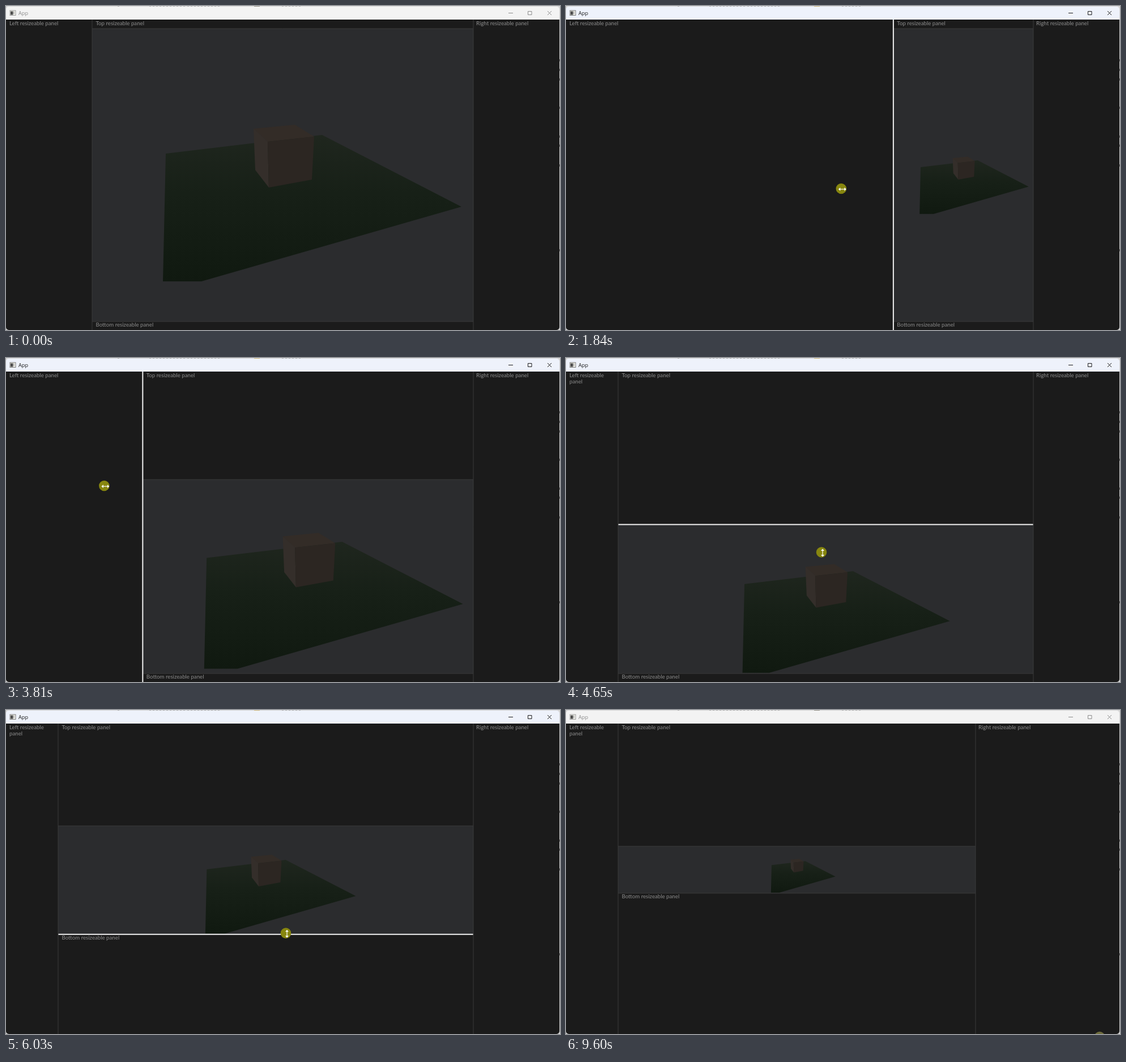
Write an HTML page with a canvas that moves like this. It is 978 px wide and 573 px high and loops after 9630 ms.

```html
<!DOCTYPE html>
<html lang="en">
<head>
<meta charset="utf-8">
<title>Resizeable panels</title>
<style>
html, body { margin: 0; width: 100%; height: 100%; overflow: hidden; background: #d9d9d9; }
canvas { display: block; }
</style>
</head>
<body>
<canvas id="stage" width="978" height="573"></canvas>
<script>
const ctx = document.getElementById('stage').getContext('2d');
const LOOP = 9630, WIDTH = 977, HEIGHT = 573, BAR = 24;

// Keys are [time, value, ...]
const leftKeys = [[1140, 152], [1520, 790], [1680, 790], [1840, 579], [2070, 353], [3600, 353], [3810, 242], [3980, 92]];
const topKeys = [[2480, 40], [2960, 215], [4480, 215], [4650, 294], [4900, 415], [4980, 415], [5260, 205], [6380, 205], [6520, 241]];
const bottomKeys = [[5620, 558], [6030, 397], [6270, 324]];
const rightKeys = [[6720, 825], [7050, 102], [7080, 93], [7500, 93], [7840, 685], [7950, 710], [8480, 710], [8700, 723]];
const cursorKeys = [
  [130, 955, 590], [500, 560, 430], [900, 170, 305], [1080, 152, 300], [1130, 152, 300],
  [1480, 800, 310], [1620, 815, 315], [1840, 487, 323], [1960, 372, 322], [2080, 361, 320],
  [2110, 361, 320], [2400, 560, 41], [2480, 560, 41], [2900, 540, 215], [3160, 540, 215],
  [3480, 354, 228], [3560, 354, 228], [3810, 174, 226], [3950, 92, 222], [4150, 92, 222],
  [4400, 467, 214], [4460, 467, 214], [4650, 451, 343], [4850, 455, 418], [4940, 455, 418],
  [5220, 470, 206], [5290, 470, 206], [5560, 490, 558], [5620, 490, 558], [6030, 494, 395],
  [6250, 500, 325], [6340, 500, 206], [6500, 500, 241], [6660, 825, 300], [6700, 825, 300],
  [7050, 79, 330], [7420, 79, 330], [7500, 40, 335], [7840, 707, 345], [7950, 714, 346],
  [8480, 714, 346], [8700, 723, 350], [8970, 723, 350], [9230, 917, 590]
];
const drags = [
  [1080, 2090, 'left'], [2450, 3060, 'top'], [3530, 4150, 'left'], [4430, 5290, 'top'],
  [5590, 6270, 'bottom'], [6350, 6530, 'top'], [6680, 8970, 'right']
];

// Smooth interpolation without overshoot
function track(keys, t, k = 1) {
  const last = keys.length - 1;
  if (t <= keys[0][0]) return keys[0][k];
  if (t >= keys[last][0]) return keys[last][k];
  const i = keys.findIndex(key => key[0] > t) - 1;
  const slope = j => (keys[j + 1][k] - keys[j][k]) / (keys[j + 1][0] - keys[j][0]);
  const tangent = j => {
    if (j === 0 || j === last) return 0;
    const a = slope(j - 1), b = slope(j);
    return a * b > 0 ? 2 * a * b / (a + b) : 0;
  };
  const [t0, t1] = [keys[i][0], keys[i + 1][0]];
  const d = t1 - t0, u = (t - t0) / d, v = 1 - u;
  return keys[i][k] * (1 + 2 * u) * v * v + tangent(i) * d * u * v * v
    + keys[i + 1][k] * u * u * (3 - 2 * u) - tangent(i + 1) * d * u * u * v;
}

function rect(x, y, w, h, color) {
  ctx.fillStyle = color;
  ctx.fillRect(x, y, w, h);
}

function path(points, closed) {
  ctx.beginPath();
  points.forEach(([x, y]) => ctx.lineTo(x, y));
  if (closed) ctx.closePath();
}

function poly(points, fill) {
  path(points, true);
  ctx.fillStyle = fill;
  ctx.fill();
}

function line(points, color, width = 1, closed = false) {
  path(points, closed);
  ctx.strokeStyle = color;
  ctx.lineWidth = width;
  ctx.stroke();
}

function label(text, x, y, room) {
  ctx.font = '9.7px Lato, "Open Sans", sans-serif';
  ctx.fillStyle = '#8c8c8c';
  let row = '';
  for (const word of text.split(' ')) {
    const next = row ? row + ' ' + word : word;
    if (row && ctx.measureText(next).width > room) {
      ctx.fillText(row, x, y);
      y += 11;
      row = word;
    } else row = next;
  }
  ctx.fillText(row, x, y);
}

function clipTo(x, y, w, h, draw) {
  ctx.save();
  ctx.beginPath();
  ctx.rect(x, y, Math.max(0, w), Math.max(0, h));
  ctx.clip();
  draw();
  ctx.restore();
}

function drawBackdrop(active) {
  rect(0, 0, 978, HEIGHT, '#d6d6d6');
  for (const [x, w] of [[197, 6], [253, 62], [320, 55], [487, 32]])
    for (let i = 0; i < w; i += 6) rect(x + i, 0, 3, 1, '#a9a9a9');
  rect(438, 0, 10, 1, active ? '#c9b070' : '#8d8a80');
  for (const y of [94, 111, 128, 178, 229, 245, 280, 430]) rect(977, y, 1, 4, '#777');
}

function drawTitle(active) {
  rect(0, 1, WIDTH, BAR - 1, active ? '#eef2fb' : '#f3f3f3');
  const ink = active ? '#191919' : '#8b8b8b';
  rect(6.5, 7.5, 11, 9.5, active ? '#777' : '#999');
  rect(7.5, 8.5, 9, 7.5, '#f5f5ee');
  rect(8, 9.5, 4.5, 6, '#4b4b4b');
  rect(13.5, 9.5, 1, 5, '#888');
  ctx.font = '9.2px "Open Sans", "Noto Sans", sans-serif';
  ctx.fillStyle = ink;
  ctx.fillText('App', 22, 16);
  line([[887, 12.5], [895, 12.5]], ink);
  line([[921.5, 9.5], [928, 9.5], [928, 15.5], [921.5, 15.5]], ink, 1, true);
  line([[956, 9], [963, 16]], ink);
  line([[963, 9], [956, 16]], ink);
}

function drawScene(l, t, r, b) {
  const w = r - l, h = b - t;
  clipTo(l, t, w, h, () => {
    rect(l, t, w, h, '#2b2c2e');
    const s = Math.max(0, Math.min((w - 2) / 671, (h - 1.6) / 377));
    ctx.translate((l + r) / 2, (t + b) / 2);
    ctx.scale(s, s);
    ctx.translate(-488.5, -299);
    const grass = ctx.createLinearGradient(0, 228, 0, 487);
    grass.addColorStop(0, '#1f261e');
    grass.addColorStop(0.4, '#172017');
    grass.addColorStop(1, '#101910');
    poly([[282, 261], [558, 228], [804, 355], [345, 487], [277, 487]], grass);
    const a = [437, 217], c = [544, 231], front = [462, 240], foot = [464, 321];
    poly([a, [510, 210], c, front], '#332c27');
    poly([a, front, foot, [440, 290]], '#342e2a');
    poly([front, c, [540, 307], foot], '#2c2622');
  });
}

function separator(points, state) {
  if (state === 2) line(points, '#f2f2f2', 2);
  else line(points, state ? '#969696' : '#3b3b3b');
}

function drawCursor(x, y, shape, color) {
  ctx.beginPath();
  ctx.arc(x, y, 9.3, 0, 2 * Math.PI);
  ctx.fillStyle = color;
  ctx.fill();
  ctx.save();
  ctx.translate(x + 2, y + 1);
  if (shape === 'arrow') {
    ctx.translate(-2, -1);
    const tip = [[0, 0], [0, 11], [2.6, 8.6], [4.4, 12.4], [6, 11.6], [4.3, 8], [7.8, 7.8]];
    poly(tip, '#fff');
    line(tip, '#222', 0.7, true);
  } else {
    if (shape === 'vertical') ctx.rotate(Math.PI / 2);
    line([[-5, 0], [5, 0]], '#fff', 1.2);
    poly([[-7, 0], [-3.5, -3], [-3.5, 3]], '#fff');
    poly([[7, 0], [3.5, -3], [3.5, 3]], '#fff');
  }
  ctx.restore();
}

function draw(time) {
  const active = time >= 1120 && time < 9600;
  const l = track(leftKeys, time), t = track(topKeys, time);
  const b = track(bottomKeys, time), r = track(rightKeys, time);
  const leaving = time >= 9600;
  const x = leaving ? 942 : track(cursorKeys, time, 1);
  const y = leaving ? 578 : track(cursorKeys, time, 2);

  const drag = drags.find(([from, to]) => time >= from && time < to);
  let hover = '';
  if (Math.abs(x - l) < 5 && y > BAR) hover = 'left';
  else if (Math.abs(x - r) < 5 && y > BAR) hover = 'right';
  else if (x > l && x < r && Math.abs(y - t) < 5) hover = 'top';
  else if (x > l && x < r && Math.abs(y - b) < 5) hover = 'bottom';
  const held = drag ? drag[2] : '';
  const grip = held || hover;
  const state = name => name === held ? 2 : name === grip ? 1 : 0;

  drawBackdrop(active);
  ctx.save();
  ctx.beginPath();
  ctx.roundRect(0, 1, WIDTH, HEIGHT - 1, 5);
  ctx.clip();
  rect(0, BAR, WIDTH, HEIGHT - BAR, '#1b1b1b');
  drawTitle(active);
  drawScene(l, t, r, b);
  clipTo(0, BAR, l, HEIGHT, () => label('Left resizeable panel', 6, 34, l - 12));
  clipTo(l, BAR, r - l, t - BAR, () => label('Top resizeable panel', l + 6.5, 34, r - l - 12));
  clipTo(l, b, r - l, HEIGHT - b, () => label('Bottom resizeable panel', l + 6.5, b + 9, r - l - 12));
  label('Right resizeable panel', r + 5, 34, WIDTH - r - 12);
  separator([[l, t], [r, t]], state('top'));
  separator([[l, b], [r, b]], state('bottom'));
  separator([[l, BAR], [l, HEIGHT]], state('left'));
  separator([[r, BAR], [r, HEIGHT]], state('right'));
  ctx.restore();

  const shape = !grip ? 'arrow' : grip === 'top' || grip === 'bottom' ? 'vertical' : 'horizontal';
  drawCursor(x, y, shape, leaving ? '#6e6c3c' : '#87860f');
}

const start = performance.now();
function tick() {
  draw((performance.now() - start) % LOOP);
  requestAnimationFrame(tick);
}
tick();
</script>
</body>
</html>
```
